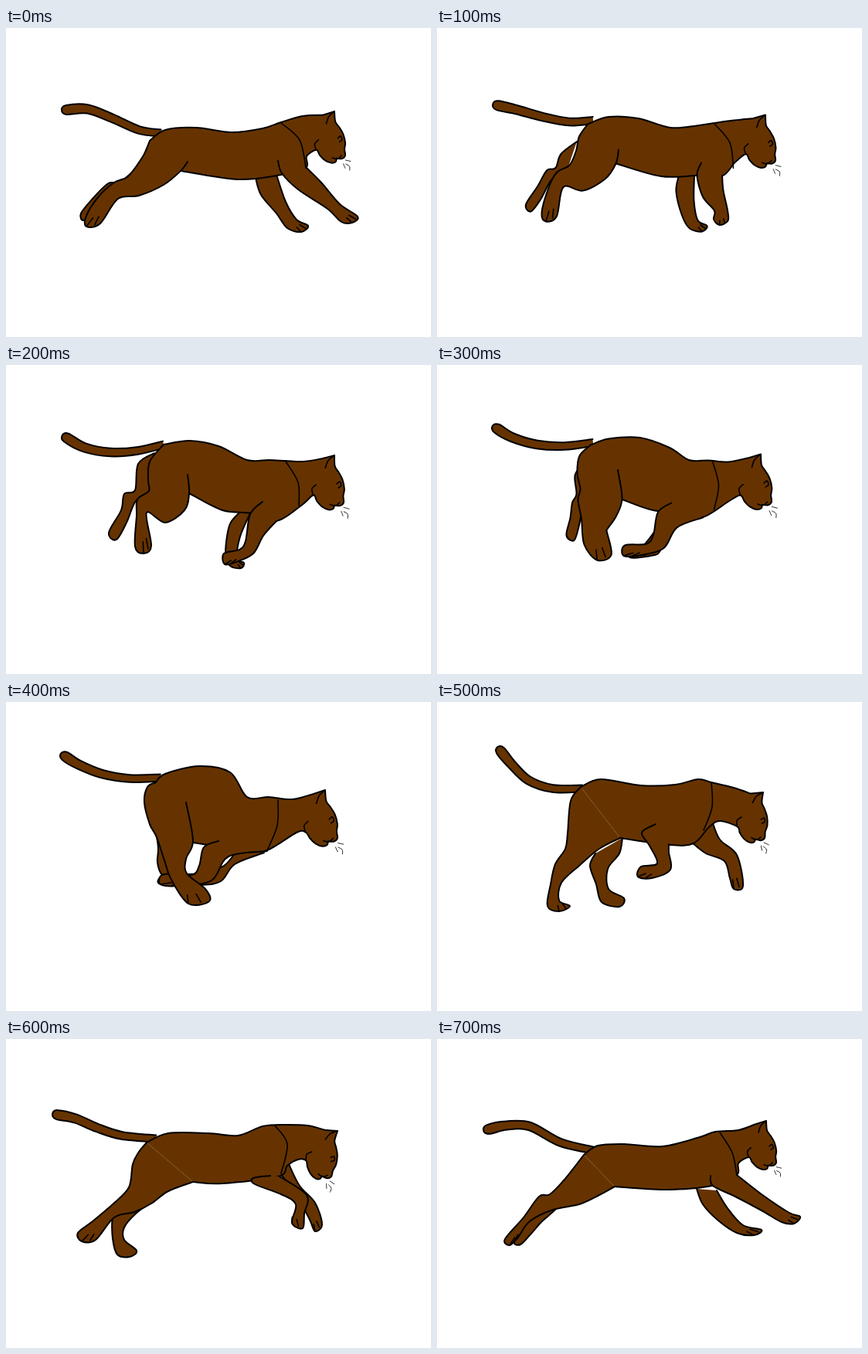
Animation of 550x400 px, one loop 0.8 s. Source, as an HTML page with a canvas:

```html
<!DOCTYPE html>
<html lang="en">
<head>
<meta charset="utf-8">
<title>Running cat</title>
<style>
html, body { margin: 0; width: 100%; height: 100%; overflow: hidden; background: #fff; }
canvas { display: block; }
</style>
</head>
<body>
<canvas id="stage" width="550" height="400"></canvas>
<script>
const points = text => {
  const n = text.split(/[ ,]+/).map(Number);
  return n.flatMap((x, i) => i % 2 ? [] : [[x, n[i + 1]]]);
};
const pose = parts =>
  Object.fromEntries(Object.entries(parts).map(([k, v]) => [k, points(v)]));
const lerp = (a, b, t = 0.5) => [a[0] + (b[0] - a[0]) * t, a[1] + (b[1] - a[1]) * t];
const mix = (a, b) =>
  Object.fromEntries(Object.keys(a).map(k => [k, a[k].map((p, i) => lerp(p, b[k][i]))]));

// head: ear tip and nose. Limbs run down the back edge, round the paw and up the front.
const reach = pose({
  head: '425 108, 439 165',
  tail: '200 136, 172 132, 138 117, 106 105, 78 106',
  back: '186 146, 206 132, 246 129, 292 135, 332 130, 356 122, 384 114',
  belly: '389 166, 388 181, 356 190, 300 196, 226 185',
  collar: '356 123, 380 145, 388 181',
  fore: '352 172, 357 188, 378 209, 416 234, 434 251, 448 252, 455 244, 432 228, 408 200, 388 180',
  hind: '186 146, 182 156, 176 168, 158 192, 140 200, 120 218, 104 243, 104 257, 122 253, 145 221, 172 217, 204 203, 226 185, 235 173',
  farFore: '323 194, 330 216, 350 240, 364 259, 382 264, 391 256, 376 248, 362 225, 350 190',
  farHind: '170 180, 150 198, 140 200, 131 202, 112 221, 97 240, 100 249, 112 240, 130 215, 150 205'
});

const land = pose({
  head: '425 117, 437 178',
  tail: '204 103, 170 111, 135 113, 102 107, 78 94',
  back: '204 103, 238 98, 275 105, 312 123, 340 123, 362 124, 384 125',
  belly: '382 182, 350 202, 318 192, 280 188, 237 166',
  collar: '362 125, 378 152, 379 182',
  fore: '332 177, 316 193, 310 228, 302 239, 282 244, 283 258, 298 255, 320 244, 333 221, 350 202',
  hind: '204 103, 186 125, 184 150, 185 163, 170 174, 169 195, 167 235, 178 244, 188 234, 182 191, 206 204, 231 188, 237 166, 235 142',
  farFore: '302 191, 289 208, 284 245, 290 260, 304 263, 308 256, 299 250, 303 222, 316 192',
  farHind: '192 114, 171 128, 167 162, 153 167, 149 188, 133 217, 143 226, 156 204, 168 176, 186 165'
});

const gather = pose({
  head: '413 114, 429 176',
  tail: '200 98, 160 99, 124 93, 94 81, 76 70',
  back: '194 104, 206 93, 250 83, 290 91, 312 123, 340 123, 370 126',
  belly: '376 169, 338 192, 312 192, 275 187, 242 182',
  collar: '352 127, 351 160, 338 192',
  fore: '275 180, 256 188, 250 212, 240 224, 204 223, 200 236, 225 238, 266 231, 288 200, 338 193',
  hind: '194 104, 183 110, 179 130, 186 158, 195 175, 205 205, 214 230, 236 261, 263 258, 258 242, 234 222, 233 203, 242 180, 233 130',
  farFore: '300 190, 282 212, 250 222, 206 224, 200 236, 250 237, 278 232, 296 210, 334 195',
  farHind: '186 140, 186 158, 194 172, 197 190, 196 208, 202 224, 212 228, 212 210, 208 195, 200 175'
});

const stand = pose({
  head: '422 117, 424 176',
  tail: '188 112, 150 112, 118 101, 96 80, 82 63',
  back: '186 110, 212 100, 264 108, 308 107, 338 100, 355 104, 384 111',
  belly: '366 154, 352 162, 332 183, 300 185, 237 176',
  collar: '355 104, 356 136, 345 166',
  fore: '283 158, 265 169, 275 186, 285 209, 264 213, 260 226, 278 228, 302 217, 300 195, 300 184',
  hind: '186 110, 173 128, 169 170, 166 190, 153 210, 147 236, 143 264, 158 271, 172 264, 158 257, 161 234, 184 212, 210 190, 237 176',
  farFore: '330 182, 348 196, 372 206, 379 228, 384 242, 396 238, 388 198, 366 178, 356 154',
  farHind: '205 196, 198 212, 206 236, 213 259, 236 265, 242 254, 222 242, 221 216, 236 196, 240 176'
});

const push = pose({
  head: '429 119, 421 178',
  tail: '194 129, 150 125, 118 115, 90 103, 66 98',
  back: '182 134, 210 122, 262 122, 300 125, 332 113, 360 111, 390 112',
  belly: '378 156, 364 164, 352 178, 280 187, 242 185',
  collar: '348 112, 364 136, 356 174',
  fore: '342 177, 320 180, 322 188, 356 201, 375 214, 370 238, 384 245, 386 226, 389 202, 354 178',
  hind: '182 134, 172 146, 164 162, 159 192, 138 214, 112 236, 93 251, 98 262, 116 260, 140 231, 166 224, 188 213, 210 197, 242 185',
  farFore: '356 176, 376 200, 388 224, 394 236, 400 249, 409 240, 400 212, 380 190, 366 162',
  farHind: '146 228, 138 232, 138 258, 144 279, 160 282, 169 274, 153 260, 153 244, 168 226, 190 210'
});

const leap = pose({
  head: '426 106, 439 160',
  tail: '202 144, 160 134, 120 113, 90 112, 66 117',
  back: '190 150, 208 138, 242 136, 292 139, 340 127, 360 120, 390 118',
  belly: '390 161, 388 176, 356 190, 295 195, 230 191',
  collar: '366 121, 382 147, 388 176',
  fore: '354 177, 357 190, 386 204, 420 222, 446 237, 462 239, 470 230, 456 225, 420 201, 388 176',
  hind: '190 150, 180 163, 164 183, 146 201, 132 204, 112 231, 88 259, 94 267, 104 258, 120 236, 150 221, 184 214, 210 202, 230 191',
  farFore: '336 194, 344 214, 364 235, 388 251, 410 254, 420 247, 396 241, 376 219, 362 196',
  farHind: '140 215, 130 225, 118 236, 106 250, 100 264, 108 266, 120 254, 134 238, 144 229, 154 220'
});

const poses = [reach, mix(reach, land), land, mix(land, gather), gather, stand, push, leap];

// Head shapes with the ear tip at 0,0 and the nose at 0,59
const face = pose({
  ear: '-16 1, 0 0',
  front: '0 0, -2 13, 1 21, 4 31, 4 43, 1 51, 0 59, -5 62, -12 60',
  jaw: '-12 60, -14 64, -20 64, -27 59, -32 51, -35 43'
});
const marks = pose({
  cheek: '-35 43, -35 35, -29 31',
  earFold: '-14 13, -9 5, 0 0',
  eye: '-4 35, 0 33, 1 38, -3 40',
  mouth: '-17 58, -11 61, -5 58'
});
const whiskers = pose({
  left: '-5 69, -4 75',
  middle: '-2 70, 2 74, 1 79',
  right: '-1 65, 5 68'
});

const ctx = document.getElementById('stage').getContext('2d');
ctx.lineCap = ctx.lineJoin = 'round';
ctx.fillStyle = '#663300';

// Smooth curve through each run of points; runs meet in corners.
function trace(...runs) {
  ctx.beginPath();
  ctx.moveTo(...runs[0][0]);
  for (const p of runs) {
    for (let i = 0; i < p.length - 1; i++) {
      const b = p[i], c = p[i + 1], a = p[i - 1] || b, d = p[i + 2] || c;
      ctx.bezierCurveTo(
        b[0] + (c[0] - a[0]) / 6, b[1] + (c[1] - a[1]) / 6,
        c[0] - (d[0] - b[0]) / 6, c[1] - (d[1] - b[1]) / 6, ...c);
    }
  }
}

function line(p, width = 1.6) {
  trace(p);
  ctx.lineWidth = width;
  ctx.stroke();
}

function shape(...runs) {
  trace(...runs);
  ctx.fill();
  ctx.lineWidth = 2;
  ctx.stroke();
}

function limb(p, paw) {
  shape(p);
  const wrist = lerp(p[paw - 1], p[paw + 3]);
  for (const toe of [p[paw + 1], lerp(p[paw + 1], p[paw + 2], 0.6)]) {
    line([toe, lerp(toe, wrist, 0.3)]);
  }
}

function tail(p) {
  const last = p.length - 1, left = [], right = [];
  let tip;
  p.forEach((q, i) => {
    const a = p[Math.max(i - 1, 0)], b = p[Math.min(i + 1, last)];
    const len = Math.hypot(b[0] - a[0], b[1] - a[1]);
    const r = 4.5 + 1.5 * i / last;
    const dx = (b[0] - a[0]) / len * r, dy = (b[1] - a[1]) / len * r;
    left.push([q[0] - dy, q[1] + dx]);
    right.unshift([q[0] + dy, q[1] - dx]);
    tip = [q[0] + dx, q[1] + dy];
  });
  shape([...left, tip, ...right]);
}

function draw(now) {
  const p = poses[Math.floor(now / 100) % poses.length];
  const [tip, nose] = p.head;
  const ux = (nose[0] - tip[0]) / 59, uy = (nose[1] - tip[1]) / 59;
  const place = list => list.map(([x, y]) => [tip[0] + x * uy + y * ux, tip[1] - x * ux + y * uy]);
  const ear = place(face.ear);

  ctx.clearRect(0, 0, 550, 400);
  ctx.strokeStyle = '#000';
  shape(p.farHind);
  limb(p.farFore, 3);
  tail(p.tail);
  shape([...p.back, ear[0]], ear, place(face.front), [...place(face.jaw), ...p.belly]);
  limb(p.fore, 4);
  limb(p.hind, 6);
  line(p.collar);
  for (const m of Object.values(marks)) line(place(m));
  ctx.strokeStyle = '#222';
  for (const w of Object.values(whiskers)) line(place(w), 1);
  requestAnimationFrame(draw);
}
requestAnimationFrame(draw);
</script>
</body>
</html>
```
